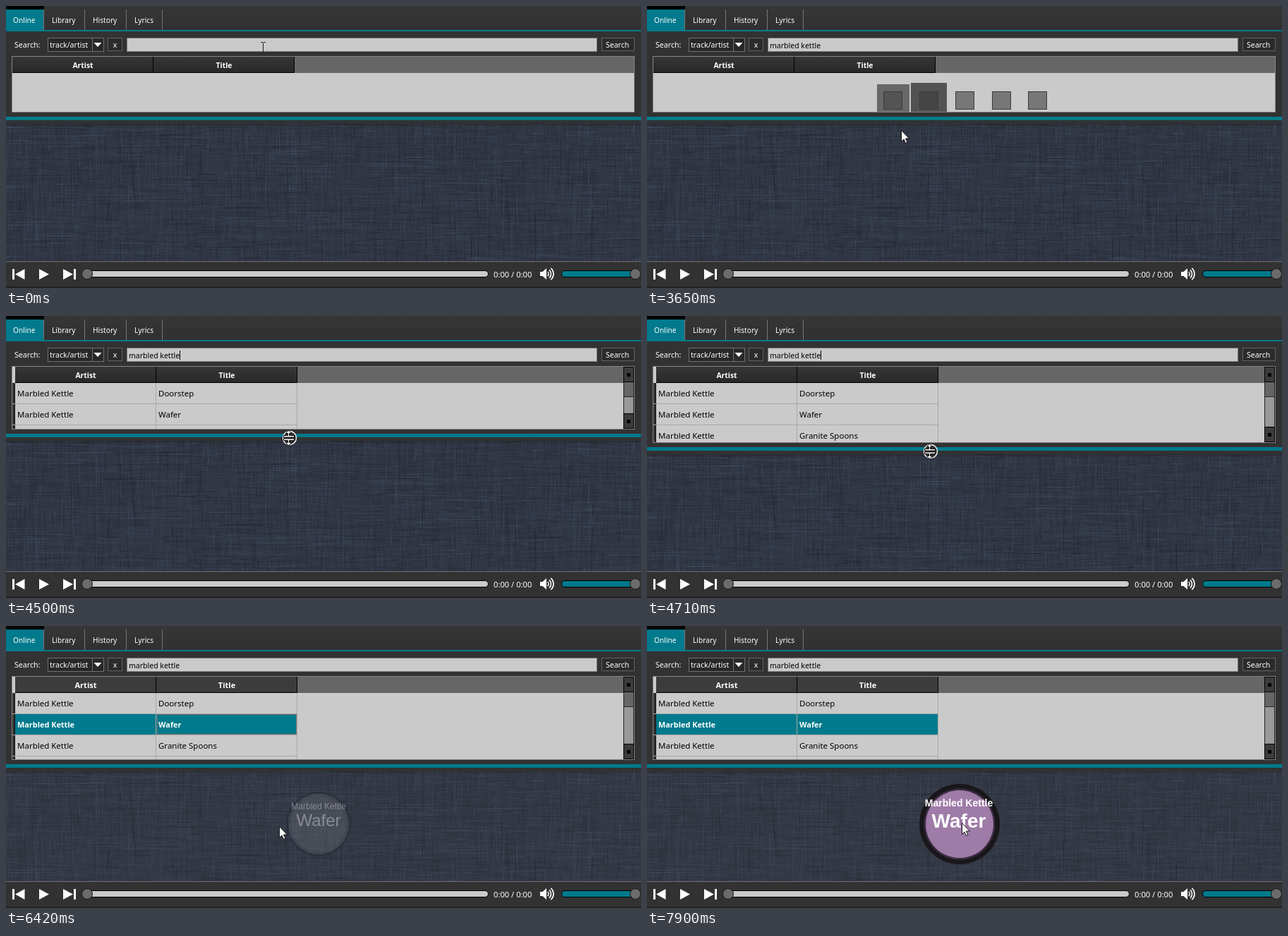
These frames come from a looping animation (900x400 px, 8 s). An HTML page with a canvas:

```html
<!DOCTYPE html>
<html lang="en">
<head>
<meta charset="utf-8">
<title>Music player search</title>
<style>
  html, body { margin: 0; width: 100%; height: 100%; overflow: hidden; background: #323232; }
  canvas { display: block; width: 900px; height: 400px; }
</style>
</head>
<body>
<canvas id="stage" width="900" height="400"></canvas>
<script>
const LOOP = 8000;
const TEAL = '#007a8c', PANEL = '#323232', LIGHT = '#cacaca';
const UI = '"Noto Sans", "Open Sans", sans-serif';
const ARIAL = '"Liberation Sans", Arial, sans-serif';
const ARTIST = 'Marbled Kettle', QUERY = ARTIST.toLowerCase();
const TITLES = ['Doorstep', 'Wafer', 'Granite Spoons'];
const ctx = document.getElementById('stage').getContext('2d');

// Stepped timelines: [start ms, value...]
const TYPED = [[0, 0], [430, 1], [640, 2], [860, 3], [1070, 4], [1290, 6], [1500, 8],
  [1930, 10], [2140, 12], [2360, 14]];
const CARET = [[0, 0], [430, 1], [2780, 0], [3860, 1], [5560, 0]];
const LOADER = [[0, -1], [2780, 0], [3650, 1], [3860, 2], [4080, -1]];
const BOTTOM = [[0, 151], [4500, 161], [4710, 180], [4920, 190]];
const POINTER = [[0, 'beam', 364, 59], [3650, 'arrow', 360, 176], [3860, 'arrow', 374, 171],
  [4080, 'arrow', 392, 173], [4290, 'split', 401, 163], [4500, 'split', 402, 173],
  [4710, 'split', 402, 192], [4920, 'split', 402, 202], [5140, 'arrow', 300, 165],
  [5350, 'arrow', 217, 138], [5560, 'arrow', 262, 180], [5770, 'arrow', 318, 222],
  [5990, 'arrow', 360, 262], [6200, 'arrow', 385, 283], [6420, 'arrow', 387, 284],
  [6630, 'arrow', 420, 282], [6840, 'arrow', 438, 280], [7050, 'arrow', 446, 279]];
const FADE = [[0, 0], [5990, 0.2], [6200, 0.6], [6420, 1], [6630, 0]];
const TINT = [[0, -1], [6630, 0.1], [6840, 0.35], [7050, 0.6], [7260, 0.85], [7470, 1]];
const SHADE = [[0, 0], [5770, 0.03], [5990, 0.06], [6200, 0.09], [6420, 0.12], [6630, 0.14]];

function at(line, t) {
  let found = line[0];
  for (const key of line) if (key[0] <= t) found = key;
  return found.slice(1);
}

function box(x, y, w, h, fill, stroke) {
  if (fill) { ctx.fillStyle = fill; ctx.fillRect(x, y, w, h); }
  if (stroke) {
    ctx.strokeStyle = stroke;
    ctx.lineWidth = 1;
    ctx.strokeRect(x + 0.5, y + 0.5, w - 1, h - 1);
  }
}

function text(str, x, y, size, color, { weight = 400, align = 'left', family = UI } = {}) {
  ctx.font = `${weight} ${size}px ${family}`;
  ctx.textAlign = align;
  ctx.fillStyle = color;
  ctx.fillText(str, x, y);
}

function shape(points, fill, stroke) {
  ctx.beginPath();
  points.forEach(([x, y]) => ctx.lineTo(x, y));
  ctx.closePath();
  if (fill) { ctx.fillStyle = fill; ctx.fill(); }
  if (stroke) { ctx.strokeStyle = stroke; ctx.lineWidth = 1; ctx.stroke(); }
}

function disc(x, y, r, fill, stroke, width = 1) {
  ctx.beginPath();
  ctx.arc(x, y, r, 0, Math.PI * 2);
  if (fill) { ctx.fillStyle = fill; ctx.fill(); }
  if (stroke) { ctx.strokeStyle = stroke; ctx.lineWidth = width; ctx.stroke(); }
}

function vertical(y0, y1, top, end) {
  const g = ctx.createLinearGradient(0, y0, 0, y1);
  g.addColorStop(0, top);
  g.addColorStop(1, end);
  return g;
}

function newCanvas(w, h) {
  const c = document.createElement('canvas');
  c.width = w;
  c.height = h;
  return c;
}

// Woven cloth: short seeded threads in both directions
function makeLinen() {
  const c = newCanvas(900, 200), g = c.getContext('2d');
  let seed = 71;
  const rnd = () => (seed = (seed * 16807) % 2147483647) / 2147483647;
  g.fillStyle = '#303643';
  g.fillRect(0, 0, 900, 200);
  for (let i = 0; i < 9000; i++) {
    const len = 8 + rnd() * rnd() * 90, a = 0.04 + rnd() * 0.12;
    g.fillStyle = rnd() < 0.5 ? `rgba(92,112,142,${a})` : `rgba(26,24,32,${a * 1.4})`;
    const x = Math.floor(rnd() * 980) - 80, y = Math.floor(rnd() * 260) - 60;
    if (i % 2) g.fillRect(x, y, len, 1);
    else g.fillRect(x, y, 1, len * 0.8);
  }
  return c;
}

function makeHatch() {
  const c = newCanvas(2, 2), g = c.getContext('2d');
  g.fillStyle = '#282828';
  g.fillRect(0, 0, 2, 2);
  g.fillStyle = '#505050';
  g.fillRect(0, 0, 1, 1);
  g.fillRect(1, 1, 1, 1);
  return ctx.createPattern(c, 'repeat');
}

const linen = makeLinen(), hatch = makeHatch();

function drawTabs() {
  box(0, 0, 900, 34, vertical(0, 34, '#363636', '#303030'));
  box(0, 0, 54, 5, '#000');
  box(0, 5, 53, 30, TEAL);
  for (const x of [53, 111, 170, 221]) box(x, 5, 1, 29, '#777');
  box(0, 34, 900, 2, TEAL);
  [['Online', 10], ['Library', 65], ['History', 123], ['Lyrics', 182]]
    .forEach(([label, x]) => text(label, x, 24, 10.2, '#fff'));
}

function drawSearch(t) {
  text('Search:', 12, 59, 10.6, '#fff');
  box(59, 45, 80, 20, '#282828', '#707070');
  box(122, 46, 1, 18, '#707070');
  text('track/artist', 62, 59, 10.6, '#fff');
  shape([[124.5, 52], [135.5, 52], [130, 58]], '#fff');
  box(144, 45, 21, 19, '#2b2b2b', '#626262');
  text('x', 154.5, 59, 10.5, '#fff', { align: 'center' });
  box(171, 45, 667, 20, LIGHT, '#777');
  box(844, 45, 47, 19, '#2b2b2b', '#626262');
  text('Search', 850, 59, 10.5, '#fff');

  const typed = QUERY.slice(0, at(TYPED, t)[0]);
  text(typed, 174, 60, 10.5, '#000');
  if (at(CARET, t)[0]) box(Math.round(174 + ctx.measureText(typed).width), 49, 1, 13, '#000');
}

function drawHeader(x, w, label, picked) {
  box(x, 72, w, 23, picked ? hatch : vertical(72, 95, '#363636', '#282828'));
  box(x, 94, w, 1, '#000');
  box(x + w - 1, 72, 1, 23, '#000');
  text(label, x + w / 2, 88, picked ? 11 : 10.4, '#fff', { weight: 700, align: 'center' });
}

function drawScrollbar(bottom) {
  box(875, 72, 15, bottom - 73, '#999', '#222');
  box(875, 93, 15, 22, '#666', '#222');
  for (const y of [72, bottom - 23]) {
    box(875, y, 15, 22, '#3c3c3c', '#000');
    box(880, y + 9, 5, 5, '#000');
  }
}

function drawRow(i, picked, focus) {
  const y = 95 + i * 30;
  const on = picked && i === 1;
  if (on) {
    box(13, y, 199, 29, TEAL);
    box(213, y, 199, 29, TEAL);
  }
  box(9, y, 3, 29, '#333');
  box(12, y, 1, 30, '#111');
  box(9, y + 29, 404, 1, '#a8a8a8');
  box(212, y, 1, 30, '#a8a8a8');
  box(412, y, 1, 30, '#a8a8a8');
  if (!TITLES[i]) return;
  const size = on ? 10.9 : 11.5, style = { weight: on ? 700 : 400 };
  text(ARTIST, 16, y + 19, size, on ? '#fff' : '#000', style);
  text(TITLES[i], 216, y + 19, size, on ? '#fff' : '#000', style);
  if (on && focus) {
    ctx.setLineDash([1, 1]);
    box(214, y, 198, 29, null, '#e8644a');
    ctx.setLineDash([]);
  }
}

function drawLoader(step) {
  for (let i = 0; i < 5; i++) {
    const cx = 348.5 + i * 51.2;
    const now = i === step, before = i === step - 1;
    if (now) box(Math.round(cx - 25.5), 109, 51, 41, '#525252');
    if (before) box(Math.round(cx - 23), 111, 46, 39, '#686868');
    box(Math.round(cx - 13.5), 121, 27, 26, now ? '#444' : before ? '#545454' : '#777', '#3c3c3c');
  }
}

function drawTable(t, bottom) {
  const results = t >= 4080, picked = t >= 5560;
  box(8, 71, 883, bottom - 71, LIGHT);
  ctx.save();
  ctx.beginPath();
  ctx.rect(9, 72, 881, bottom - 73);
  ctx.clip();
  const shift = results ? 4 : 0;
  box(409 + shift, 72, 482, 23, '#666');
  drawHeader(9 + shift, 200, 'Artist', picked);
  drawHeader(209 + shift, 200, 'Title', picked);
  if (results) {
    for (let i = 0; i < 4; i++) drawRow(i, picked, t < 7900);
    drawScrollbar(bottom);
  }
  const step = at(LOADER, t)[0];
  if (step >= 0) drawLoader(step);
  ctx.restore();
  box(8, 71, 883, bottom - 71, null, '#858585');
}

function drawBubble(t) {
  const fade = at(FADE, t)[0], tint = at(TINT, t)[0];
  const x = 443, y = 281;
  const center = { align: 'center', family: ARIAL };
  if (fade) {
    ctx.globalAlpha = fade;
    disc(x, y, 44, 'rgba(160,160,165,0.13)', 'rgba(20,20,25,0.28)', 3);
    disc(x, y, 39, 'rgba(170,170,175,0.06)');
    text(ARTIST, x, 260, 12, 'rgba(190,192,198,0.55)', center);
    text(TITLES[1], x, 284, 24, 'rgba(190,192,198,0.55)', center);
    ctx.globalAlpha = 1;
  }
  if (tint >= 0) {
    disc(x, y, 57, '#18171b');
    ctx.globalAlpha = tint;
    disc(x, y, 50.5, '#3c2c41');
    disc(x, y, 48, '#9f7ba8');
    ctx.globalAlpha = 1;
    center.weight = 700;
    text(ARTIST, x - 1, 256, 14, '#fff', center);
    text(TITLES[1], x - 1, 286, 28, '#fff', center);
  }
}

function drawCloth(t, top) {
  ctx.save();
  ctx.beginPath();
  ctx.rect(0, top, 900, 362 - top);
  ctx.clip();
  ctx.drawImage(linen, 0, top);
  box(0, top, 900, 5, vertical(top, top + 5, 'rgba(0,0,0,0.2)', 'rgba(0,0,0,0)'));
  ctx.globalAlpha = at(SHADE, t)[0];
  box(0, top, 900, 200, '#4a4a4c');
  ctx.globalAlpha = 1;
  drawBubble(t);
  ctx.restore();
}

function drawGroove(x, w, fill) {
  ctx.beginPath();
  ctx.roundRect(x + 0.5, 375.5, w - 1, 9, 4.5);
  ctx.fillStyle = fill;
  ctx.fill();
  ctx.strokeStyle = '#000';
  ctx.lineWidth = 1;
  ctx.stroke();
}

function drawControls() {
  box(0, 362, 900, 38, '#323232');
  box(0, 362, 900, 1, '#707070');
  box(0, 398, 900, 2, '#222');
  box(9, 373, 3, 15, '#fff');
  shape([[26.5, 373], [26.5, 388], [13, 380.5]], '#fff');
  shape([[47, 373], [61, 380.5], [47, 388]], '#fff');
  shape([[81, 373], [95, 380.5], [81, 388]], '#fff');
  box(96, 373, 3, 15, '#fff');
  drawGroove(108, 576, LIGHT);
  drawGroove(787, 110, TEAL);
  disc(115, 380, 7.5, '#6b6b6b', '#181818');
  disc(892, 380, 7.5, '#6b6b6b', '#181818');
  text('0:00 / 0:00', 691, 385, 11.2, '#fff');
  shape([[757, 377], [760.5, 377], [766, 372], [766, 388], [760.5, 383], [757, 383]], '#fff');
  ctx.strokeStyle = '#fff';
  ctx.lineWidth = 1.6;
  for (const r of [4, 7.5, 11]) {
    ctx.beginPath();
    ctx.arc(765, 380, r, -0.85, 0.85);
    ctx.stroke();
  }
}

function drawPointer(kind, x, y) {
  ctx.save();
  ctx.translate(x, y);
  if (kind === 'beam') {
    box(0, -7, 1, 15, '#222');
    for (const dy of [-8, 8]) {
      box(-3, dy, 3, 1, '#222');
      box(1, dy, 3, 1, '#222');
    }
  } else if (kind === 'arrow') {
    shape([[0.5, 0.5], [0.5, 16.5], [4, 13], [6.5, 18.5], [9, 17.5], [6.5, 12], [11.5, 12]],
      '#fff', '#111');
  } else {
    disc(0, 0, 9.5, '#333', '#fff', 1.3);
    for (const s of [-1, 1]) {
      shape([[-1.5, s * 11], [-5.5, s * 6.5], [-2.5, s * 6.5], [-2.5, s * 3.5], [-8.5, s * 3.5],
        [-8.5, s], [6.5, s], [6.5, s * 3.5], [-0.5, s * 3.5], [-0.5, s * 6.5], [2.5, s * 6.5]],
        '#fff', '#111');
    }
  }
  ctx.restore();
}

function draw(t) {
  const [bottom] = at(BOTTOM, t);
  box(0, 0, 900, 400, PANEL);
  drawTabs();
  drawSearch(t);
  drawTable(t, bottom);
  box(0, bottom + 6, 900, 5, TEAL);
  drawCloth(t, bottom + 16);
  drawControls();
  drawPointer(...at(POINTER, t));
}

function tick() {
  draw(performance.now() % LOOP);
  requestAnimationFrame(tick);
}
tick();
</script>
</body>
</html>
```
